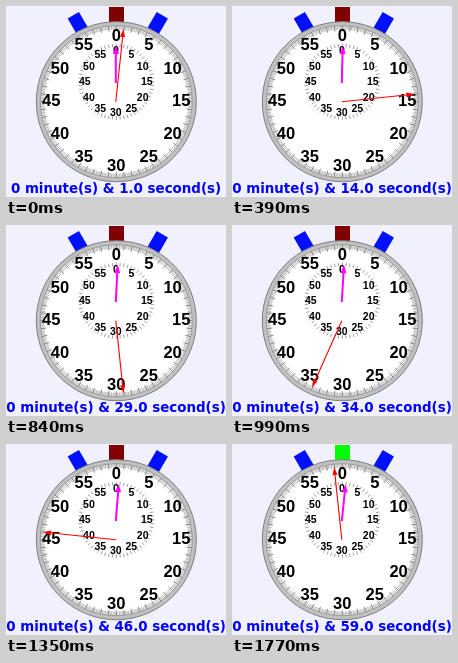
An HTML page with a canvas for the animation above (1.8 s loop, 220 px wide and 191 px high).

```html
<!DOCTYPE html>
<html lang="en">
<head>
<meta charset="utf-8">
<title>Stopwatch</title>
<style>
html, body { margin: 0; width: 220px; height: 191px; overflow: hidden; background: #f0f0ff; }
canvas { display: block; }
</style>
</head>
<body>
<canvas id="c" width="220" height="191"></canvas>
<script>
const ctx = document.getElementById('c').getContext('2d');
const STEP = 30, STEPS = 60;
const CX = 110.3, CY = 95.7, SUB_Y = 75.8;
const HAND_X = 109.8;
const SANS = '"Liberation Sans", Arial, sans-serif';
const WIDE = 'Verdana, "DejaVu Sans", sans-serif';

function polar(cx, cy, r, deg) {
  const a = deg * Math.PI / 180;
  return [cx + r * Math.sin(a), cy - r * Math.cos(a)];
}

function disc(r, fill, stroke) {
  ctx.beginPath();
  ctx.arc(CX, CY, r, 0, 2 * Math.PI);
  ctx.fillStyle = fill;
  ctx.fill();
  ctx.strokeStyle = stroke;
  ctx.lineWidth = 1;
  ctx.stroke();
}

function ticks(cy, inner, outer, count, color, width) {
  ctx.beginPath();
  for (let i = 0; i < count; i++) {
    const deg = i * 360 / count;
    ctx.moveTo(...polar(CX, cy, inner, deg));
    ctx.lineTo(...polar(CX, cy, outer, deg));
  }
  ctx.strokeStyle = color;
  ctx.lineWidth = width;
  ctx.stroke();
}

function numbers(cx, cy, r, size) {
  ctx.font = `bold ${size}px ${SANS}`;
  ctx.textAlign = 'center';
  ctx.textBaseline = 'alphabetic';
  ctx.fillStyle = '#000';
  for (let n = 0; n < 60; n += 5) {
    const [x, y] = polar(cx, cy, r, n * 6);
    ctx.fillText(n, x, y + size * 0.36);
  }
}

function button(x, y, w, h, deg, fill) {
  ctx.save();
  ctx.translate(x, y);
  ctx.rotate(deg * Math.PI / 180);
  ctx.fillStyle = fill;
  ctx.fillRect(-w / 2, -h / 2, w, h);
  ctx.restore();
}

function hand(cy, length, deg, color, width, headW, headL) {
  ctx.save();
  ctx.translate(HAND_X, cy);
  ctx.rotate(deg * Math.PI / 180);
  ctx.strokeStyle = ctx.fillStyle = color;
  ctx.lineWidth = width;
  ctx.beginPath();
  ctx.moveTo(0, 0);
  ctx.lineTo(0, -length + headL / 2);
  ctx.stroke();
  ctx.beginPath();
  ctx.moveTo(0, -length);
  ctx.lineTo(headW / 2, -length + headL);
  ctx.lineTo(-headW / 2, -length + headL);
  ctx.fill();
  ctx.restore();
}

function draw(step) {
  const sec = Math.min(step + 1, 59);
  const done = step === STEPS - 1;
  ctx.fillStyle = '#f0f0ff';
  ctx.fillRect(0, 0, 220, 191);

  button(71.8, 17, 13, 18, -30, '#0010ff');
  button(151.8, 17, 13, 18, 30, '#0010ff');
  button(110.5, 9, 15, 16, 0, done ? '#00ff00' : '#800000');

  disc(80, '#c0c0c0', '#808080');
  disc(76, '#fff', '#a0a0a0');
  ticks(CY, 72, 76, 300, '#999', 0.7);
  ticks(CY, 70.5, 76, 60, '#777', 0.8);
  ticks(SUB_Y, 34.5, 38, 60, '#888', 0.8);
  numbers(CX, 94.2, 65, 16.5);
  numbers(CX - 0.5, 75.4, 31, 10.5);

  hand(SUB_Y + 1.2, 37, sec / 10, '#f0f', 2, 6, 8);
  hand(CY, 73, sec * 6, '#f00', 1.1, 5, 8);

  ctx.font = `bold 13.4px ${WIDE}`;
  ctx.textAlign = 'center';
  ctx.fillStyle = '#0000ff';
  ctx.fillText(`0 minute(s) & ${sec.toFixed(1)} second(s)`, 110, 187);
}

let start = null;
function tick(now) {
  if (start === null) start = now;
  draw(Math.floor((now - start) / STEP) % STEPS);
  requestAnimationFrame(tick);
}
draw(0);
requestAnimationFrame(tick);
</script>
</body>
</html>
```
